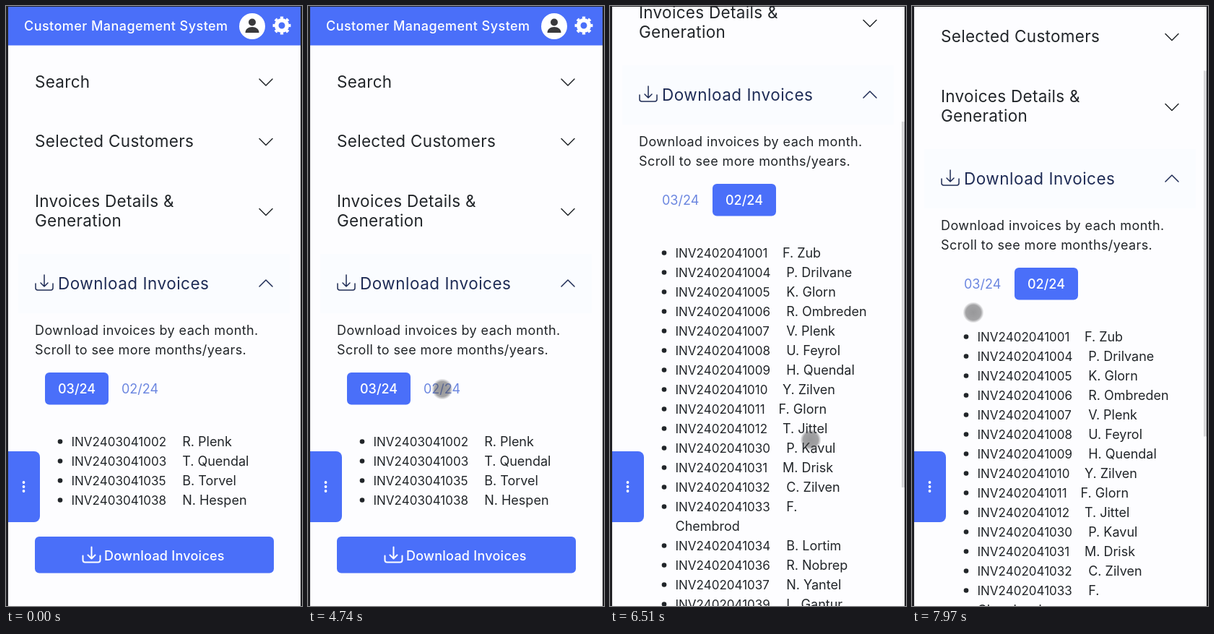
Write an HTML page that moves like this. It is 410 px wide and 830 px high and loops after 8 s.

```html
<!DOCTYPE html>
<html lang="en">
<head>
<meta charset="utf-8">
<title>Customer Management System</title>
<style>
  html, body { margin: 0; width: 100%; height: 100%; overflow: hidden; background: #fdfdff; }
  svg { display: block; width: 100vw; height: 100vh; }
  text { font: 400 18px Inter, sans-serif; fill: #212529; white-space: pre; }
  .heading { font-size: 22.5px; letter-spacing: .3px; }
  .open { fill: #1f2c56; letter-spacing: .5px; }
  .note { letter-spacing: .4px; }
  .number { font-size: 17px; }
  .title, .action { font-weight: 500; fill: #fff; letter-spacing: .45px; }
  .action { letter-spacing: .25px; }
  .tab { fill: #6b86e0; }
  .tab.active { fill: #fff; font-weight: 500; }
  .blue { fill: #4a6ff9; }
  .line { fill: none; stroke: #212529; stroke-width: 1.5; stroke-linecap: round; stroke-linejoin: round; }
  .line .navy { stroke: #1f2c56; }
  .line.white { stroke: #fff; stroke-width: 2; }
</style>
</head>
<body>
<svg viewBox="0 0 410 830" preserveAspectRatio="none">
  <defs>
    <radialGradient id="touch">
      <stop offset="0" stop-color="#48484a" stop-opacity=".56"/>
      <stop offset=".72" stop-color="#48484a" stop-opacity=".5"/>
      <stop offset="1" stop-color="#48484a" stop-opacity="0"/>
    </radialGradient>
    <path id="download" d="M41 384v6a3 3 0 0 0 3 3h18a3 3 0 0 0 3-3v-6M53 372v16m-5-5 5 5 5-5"/>
    <path id="chevron" d="M-9-4.5 0 4.5 9-4.5"/>
  </defs>
  <rect width="410" height="830" fill="#fdfdff"/>
  <g id="page">
    <rect class="blue" width="410" height="54.5"/>
    <text class="title" x="25" y="34">Customer Management System</text>
    <circle cx="341" cy="28" r="18" fill="#fff"/>
    <g fill="#3a3a3c">
      <circle cx="341" cy="22.5" r="5"/>
      <path d="M331.500 37c0-5 4-8 9.500-8s9.500 3 9.500 8z"/>
    </g>
    <g fill="none" stroke="#fff">
      <circle cx="382" cy="27" r="7.300" stroke-width="5.600"/>
      <circle cx="382" cy="27" r="10.500" stroke-width="4" pathLength="16" stroke-dasharray="1 1" stroke-dashoffset=".5"/>
    </g>

    <text class="heading" x="40" y="113">Search</text>
    <text class="heading" x="40" y="195">Selected Customers</text>
    <text class="heading" x="40" y="278">Invoices Details &amp;</text>
    <text class="heading" x="40" y="305">Generation</text>
    <rect x="17" y="343" width="376" height="82" fill="#fafcff"/>
    <text class="heading open" x="72" y="392">Download Invoices</text>
    <g class="line">
      <use href="#chevron" x="360" y="105.500"/>
      <use href="#chevron" x="360" y="188"/>
      <use href="#chevron" x="360" y="285"/>
      <use class="navy" href="#chevron" transform="translate(360 383.500) scale(1 -1)"/>
      <use class="navy" href="#download"/>
    </g>

    <text class="note" x="40" y="455">Download invoices by each month.</text>
    <text class="note" x="40" y="482">Scroll to see more months/years.</text>
    <rect id="pill" class="blue" x="54" y="507" width="88" height="44.500" rx="6"/>
    <text class="tab" x="72" y="536">03/24</text>
    <text class="tab" x="160" y="536">02/24</text>
    <g id="march"></g>
    <g id="february"></g>
    <g id="button">
      <rect class="blue" x="40" y="734" width="331" height="50.500" rx="6"/>
      <use class="line white" href="#download" x="65.500" y="376.500"/>
      <text class="action" x="136" y="767">Download Invoices</text>
    </g>
  </g>

  <path class="blue" d="M3 616h36a8 8 0 0 1 8 8v82a8 8 0 0 1-8 8H3z"/>
  <g fill="#fff">
    <circle cx="24.500" cy="659" r="1.900"/>
    <circle cx="24.500" cy="665" r="1.900"/>
    <circle cx="24.500" cy="671" r="1.900"/>
  </g>
  <rect id="thumb" x="404" width="4" height="506" fill="#d6d6d8"/>
  <path fill="#222226" d="M0 0h410v830h-2V1H3v829H0z"/>
  <circle id="cursor" r="14.500" fill="url(#touch)"/>
</svg>
<script>
const LOOP = 8000, SWITCH = 4760, ROW = 27;
const $ = id => document.getElementById(id);

const march = `1002 R. Plenk|1003 T. Quendal|1035 B. Torvel|1038 N. Hespen`;
const february = `1001 F. Zub|1004 P. Drilvane|1005 K. Glorn|1006 R. Ombreden|1007 V. Plenk|1008 U. Feyrol
|1009 H. Quendal|1010 Y. Zilven|1011 F. Glorn|1012 T. Jittel|1030 P. Kavul|1031 M. Drisk|1032 C. Zilven
|1033 F. /Chembrod|1034 B. Lortim|1036 R. Nobrep|1037 N. Yantel|1039 L. Gantur|1040 D. Velys|1041 A. Skoynt
|1042 T. Huv|1049 S. Narb|1050 P. Fendo`;

// Fills a list and returns the baseline of its last row. A slash wraps the name.
function buildList(group, prefix, source) {
  let y = 609 - ROW, html = '';
  for (const entry of source.replace(/\n/g, '').split('|')) {
    y += ROW;
    const number = prefix + entry.slice(0, 4);
    const [name, wrapped] = entry.slice(5).split('/');
    const ones = number.split('1').length - 1;
    html += `<circle cx="75" cy="${y - 6.5}" r="3.3" fill="#212529"/>
      <text class="number" x="90.500" y="${y}">${number}</text>
      <text x="${249.5 - 5.3 * ones}" y="${y}">${name}</text>`;
    if (wrapped) html += `<text x="90.500" y="${y += ROW}">${wrapped}</text>`;
  }
  group.innerHTML = html;
  return y;
}
const marchEnd = buildList($('march'), 'INV240304', march);
const februaryEnd = buildList($('february'), 'INV240204', february);
const tabs = document.querySelectorAll('.tab');

// Keys: time, then values; eased from key to key.
const scrollKeys = [[5730, 0], [6510, 261], [7370, 388], [7970, 145]];
const cursorKeys = [[3480, -16, 400], [3800, 151, 394], [4600, 186, 530], [4950, 186, 530],
  [5600, 277, 684], [5730, 277, 684], [6510, 278, 600], [7370, 327, 426], [7970, 85, 424]];

function sample(keys, time) {
  const next = keys.findIndex(key => key[0] > time);
  if (next === 0) return keys[0].slice(1);
  if (next < 0) return keys[keys.length - 1].slice(1);
  const a = keys[next - 1], b = keys[next];
  const u = (time - a[0]) / (b[0] - a[0]), eased = u * u * (3 - 2 * u);
  return a.slice(1).map((value, i) => value + (b[i + 1] - value) * eased);
}

function draw(now) {
  const time = now % LOOP;
  const switched = time >= SWITCH;
  const [scroll] = sample(scrollKeys, time);
  const [x, y] = sample(cursorKeys, time);

  $('page').setAttribute('transform', `translate(0 ${-scroll})`);
  $('pill').setAttribute('x', switched ? 142 : 54);
  tabs[0].classList.toggle('active', !switched);
  tabs[1].classList.toggle('active', switched);
  $('march').style.display = switched ? 'none' : '';
  $('february').style.opacity = Math.min(1, Math.max(0, (time - SWITCH) / 150));
  $('button').setAttribute('transform', `translate(0 ${switched ? februaryEnd - marchEnd : 0})`);

  $('thumb').style.display = scroll > 0 ? '' : 'none';
  $('thumb').setAttribute('y', 1.5 + scroll * .607);
  $('cursor').setAttribute('transform', `translate(${x} ${y})`);
  requestAnimationFrame(draw);
}
draw(0);
</script>
</body>
</html>
```
